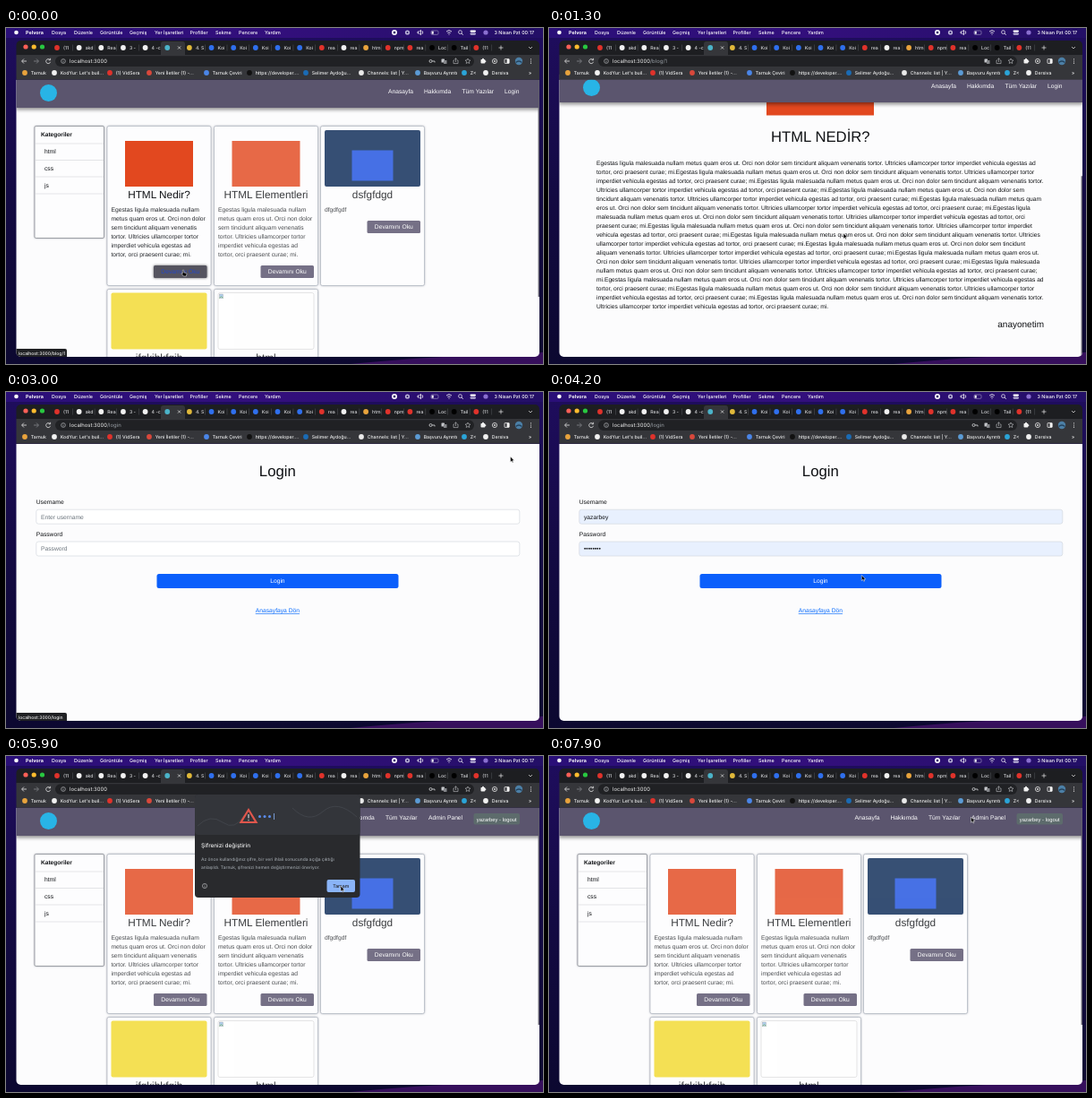
Recreate the animation shown at these times as an HTML page. Size 600 by 375 pixels, loop 8000 ms.

```html
<!DOCTYPE html>
<html lang="tr">
<head>
<meta charset="utf-8">
<style>
html, body { margin: 0; width: 100%; height: 100%; overflow: hidden; background: #120a33; }
svg { display: block; width: 600px; height: 375px; }
text { white-space: pre; text-rendering: geometricPrecision; }
.page, .page p { font-family: "Liberation Sans", Arial, sans-serif; font-size: 6.73px; }
.ui { font-family: Inter, sans-serif; font-size: 5.2px; font-weight: 500; }
.page p { margin: 0; font-size: 6.7px; line-height: 10px; color: #0f1114; text-rendering: geometricPrecision; }
.nav { filter: drop-shadow(0 2px 2px #0007); }
.frame { fill: #fdfdfe; stroke: #a4abb8; stroke-width: .6; filter: drop-shadow(0 0 1px #3a425566); }
</style>
</head>
<body>
<svg id="stage" viewBox="0 0 600 375"></svg>
<script>
const INK = '#0f1114', NAV = '#5b556e', BAR = '#35363a', ORANGE = '#e2481f';

const text = (x, y, s, attrs = '') => `<text x="${x}" y="${y}" ${attrs}>${s}</text>`;
const mid = (x, y, s, attrs = '') => text(x, y, s, 'text-anchor="middle" ' + attrs);
const rect = (x, y, w, h, fill, r = 0, attrs = '') =>
  `<rect x="${x}" y="${y}" width="${w}" height="${h}" fill="${fill}" rx="${r}" ${attrs}/>`;
const dot = (x, y, r, fill, attrs = '') => `<circle cx="${x}" cy="${y}" r="${r}" fill="${fill}" ${attrs}/>`;
const line = (d, color, w = .8) => `<path d="${d}" fill="none" stroke="${color}" stroke-width="${w}"/>`;
const group = (id, body, attrs = '') => `<g id="${id}" ${attrs}>${body}</g>`;
const size = n => `style="font-size:${n}px"`;
const backdrop = rect(11, 58, 586, 310, '#fcfcfd');

// Desktop menu bar
function menuBar() {
  const items = [[51, 'Dosya'], [76, 'Düzenle'], [105, 'Görüntüle'], [138, 'Geçmiş'], [166, 'Yer İşaretleri'],
    [205.5, 'Profiller'], [234, 'Sekme'], [260, 'Pencere'], [289, 'Yardım']];
  return `<g class="ui" fill="#fff" style="font-size:5.4px">` + dot(11.5, 5, 2.3, '#fff')
    + text(22, 7, 'Pelvora', 'font-weight="700"')
    + items.map(([x, s]) => text(x, 7, s)).join('')
    + dot(434, 5, 3, '#fff') + rect(432.8, 3.8, 2.4, 2.4, '#2a1668')
    + dot(448.5, 5, 2.6, '#b9b2d6') + dot(448.5, 5, 1, '#2a1668')
    + line('M460 4h1.5l2-1.6v5.2l-2-1.6h-1.5zM465 3.2q1.6 1.8 0 3.6', '#fff')
    + rect(475, 3, 8, 4.4, 'none', 1.2, 'stroke="#a49dc4" stroke-width=".6"') + rect(475.7, 3.7, 2, 3, '#fff')
    + line('M492 4q3-3 6 0M493.4 5.6q1.6-1.5 3.2 0', '#fff') + dot(495, 7, .6, '#fff')
    + dot(507.5, 4.6, 1.9, 'none', 'stroke="#fff" stroke-width=".7"') + line('M509 6l1.7 1.8', '#fff')
    + rect(518.5, 2.4, 6.5, 2.3, '#fff', 1.1) + rect(518.5, 5.4, 6.5, 2.3, '#b9b2d6', 1.1)
    + dot(536, 5, 2.6, '#8a6fd0')
    + text(545.5, 7, '3 Nisan Pzt 00:17') + '</g>';
}

// Browser tabs, address bar and bookmarks
function browser() {
  const white = '#f1f1f1', red = '#e0322b', blue = '#2f6fed';
  const tabs = [[red, '(11'], [white, 'akd'], [white, 'Rea'], [white, '3 -'], [white, '4 -c'], ['#4bb3c9', ''],
    ['#e0b83a', '4. S'], [blue, 'Koi'], [blue, 'Koi'], [blue, 'Koi'], [blue, 'Koi'], [blue, 'Koi'], [red, 'rea'],
    [white, 'rea'], ['#e8a33c', 'htm'], [red, 'npm'], [red, 'rea'], ['#000', 'Loc'], ['#000', 'Tail'], [red, '(11']];
  const marks = [[21, '#e8a33c', 'Tarnuk'], [54, white, "KodYur: Let's buil..."], [116, red, '(1) VidSera'],
    [160, '#d9483b', 'Yeni İletiler (1) -...'], [224, '#4a86e8', 'Tarnuk Çeviri'], [272, '#111', 'https://developer....'],
    [335, '#1a6bb5', 'Selimer Aydoğu...'], [397, '#e9e9e9', 'Channels: list | Y...'], [460, '#5b9bd5', 'Başvuru Ayrıntı'],
    [512, '#2aa4d8', 'Z&lt;'], [536, white, 'Dersiva']];
  let s = rect(11, 14, 586, 17, '#1d1e21') + rect(11, 30, 586, 27.7, BAR)
    + rect(173, 15, 27, 20, BAR, 3)
    + dot(22, 21, 2.6, '#ff5f57') + dot(31.2, 21, 2.6, '#febc2e') + dot(40.5, 21, 2.6, '#28c840');
  tabs.forEach(([color, name], i) => {
    const x = 57 + i * 24.65;
    s += dot(x, 22, 2.9, color) + text(x + 7, 24, name, 'fill="#d5d6d9"');
    if (i != 4 && i != 5) s += rect(x + 17.2, 18.5, .5, 7, '#55575c');
  });
  s += line('M192 20.4l3.2 3.2M195.2 20.4l-3.2 3.2M550.5 22h5M553 19.5v5M584 21l2 2 2-2', '#e8e8e8', .7)
    + line('M23 37h-5M20 34.5l-2.5 2.5 2.5 2.5', '#e8e8e8')
    + line('M31 37h5M34 34.5l2.5 2.5-2.5 2.5', '#85878b')
    + line('M49 35.4a2.5 2.5 0 1 0 .6 2.4M49.6 33.8v2h-2', '#e8e8e8')
    + rect(55, 31.2, 468, 11.8, '#202124', 5.9)
    + dot(64, 37, 2.4, 'none', 'stroke="#c4c6ca" stroke-width=".6"') + line('M64 36.6v1.8M64 35.4v.5', '#c4c6ca', .6)
    + `<text x="71" y="39" fill="#f1f1f1" font-weight="400" style="font-size:5.95px">localhost:3000<tspan id="path" fill="#9aa0a6"></tspan></text>`
    + group('key', dot(474.5, 37, 1.5, 'none', 'stroke="#d5d6d9" stroke-width=".8"') + line('M476 37h3v1.5', '#d5d6d9'))
    + rect(486.5, 34.5, 3.5, 4, '#c4c6ca', .5) + rect(489, 36, 3.5, 4, '#85878b', .5)
    + line('M501 36h-1v3.6h5V36h-1M502.5 38v-4M501.2 35l1.3-1.2 1.3 1.2', '#c4c6ca', .6)
    + line('M516 34l.9 1.9 2 .2-1.5 1.4.4 2-1.8-1-1.8 1 .4-2-1.5-1.4 2-.2z', '#c4c6ca', .6)
    + rect(530.5, 35, 4.8, 4.6, '#f1f1f1', .8) + dot(533, 34.8, 1, '#f1f1f1') + dot(535.4, 37.3, 1, '#f1f1f1')
    + dot(546, 37, 2.6, 'none', 'stroke="#e8e8e8" stroke-width=".8"') + dot(546, 37, .9, '#e8e8e8')
    + rect(557, 34.6, 5.2, 4.8, 'none', .5, 'stroke="#f1f1f1" stroke-width=".8"') + rect(559.6, 34.6, 2.6, 4.8, '#f1f1f1')
    + dot(573, 37, 4.2, '#4c7fa6') + line('M569.6 38.5q3.4-3 6.8 0', '#22415c', 1.6)
    + [34.8, 37, 39.2].map(y => dot(586.5, y, .6, '#e8e8e8')).join('');
  for (const [x, color, name] of marks)
    s += dot(x, 50, 2.9, color) + text(x + 6.7, 51.9, name, 'fill="#eceded"');
  s += text(584, 52, '»', 'fill="#eceded"');
  return `<g class="ui">${s}</g>`;
}

function navBar(id, links, y, extra = '') {
  return group(id, rect(11, 57.7, 586, 31.3, NAV, 0, 'class="nav"') + dot(47.5, 72.5, 9.5, '#28b4e6')
    + links.map(([x, s]) => text(x, y, s, 'fill="#fff"')).join('') + extra);
}
const guestLinks = [[427, 'Anasayfa'], [467, 'Hakkımda'], [509.5, 'Tüm Yazılar'], [557, 'Login']];
const userLinks = [[341.5, 'Anasayfa'], [381.5, 'Hakkımda'], [424, 'Tüm Yazılar'], [472, 'Admin Panel']];

const SENTENCE = 'Egestas ligula malesuada nullam metus quam eros ut. Orci non dolor sem tincidunt aliquam venenatis '
  + 'tortor. Ultricies ullamcorper tortor imperdiet vehicula egestas ad tortor, orci praesent curae; mi.';
const EXCERPT = ['Egestas ligula malesuada nullam', 'metus quam eros ut. Orci non dolor', 'sem tincidunt aliquam venenatis',
  'tortor. Ultricies ullamcorper tortor', 'imperdiet vehicula egestas ad', 'tortor, orci praesent curae; mi.'];

// Cards are drawn at the origin of their own corner
const htmlMark = rect(20, 16.5, 76, 51, ORANGE);
const cssPic = rect(4.5, 4.5, 107, 63, '#0b2a56', 2) + rect(35, 27, 46, 34, '#1f52e0');
const jsPic = rect(4.5, 4, 107, 63, '#f2d92f', 2);
const noPic = rect(4.5, 4, 107, 63, '#fff', 2, 'stroke="#ccc" stroke-width=".6"')
  + rect(6, 5.5, 4, 4.6, '#9fc3ea', 0, 'stroke="#888" stroke-width=".4"') + line('M6 10l2-2 2 2', '#5aa54a');
const cards = [
  [113, 109.5, htmlMark, 'HTML Nedir?', EXCERPT, 155.5],
  [232.5, 109.5, htmlMark, 'HTML Elementleri', EXCERPT, 155.5],
  [351.5, 109.5, cssPic, 'dsfgfdgd', ['dfgdfgdf'], 105.5],
  [113, 291.5, jsPic, 'jfgkjhkfgjh', [], 155.5],
  [232.5, 291.5, noPic, 'html', [], 155.5]];

function card([x, y, pic, title, lines, by], i) {
  return `<g transform="translate(${x} ${y})">` + rect(0, 0, 116, 178, '#fff', 2, 'class="frame"')
    + group('card' + i, pic + mid(58, 80, title, `fill="${INK}" ${size(11.8)}`)
      + lines.map((s, n) => text(4.5, 95.9 + n * 10, s, 'fill="#24272b"')).join('')
      + rect(52, by, 59.5, 14, '#58526c', 1.5, `id="btn${i}"`)
      + mid(81.8, by + 9.3, 'Devamını Oku', `fill="#fff" id="label${i}"`)) + '</g>';
}

function home() {
  const rows = [[140.3, 'html'], [159.2, 'css'], [177.8, 'js']];
  return backdrop + rect(32, 109.5, 77.5, 125, '#fff', 1.5, 'class="frame" style="stroke:#6b6e76"')
    + text(39, 121.3, 'Kategoriler', `fill="${INK}" font-weight="700" ${size(6.6)}`)
    + rows.map(([y, s]) => text(43, y, s, `fill="${INK}"`)).join('')
    + [129, 147.5, 166, 185].map(y => rect(32.4, y - .3, 76.7, .6, '#d3d4d8')).join('')
    + cards.map(card).join('')
    + navBar('guestNav', guestLinks, 72.6)
    + navBar('userNav', userLinks, 71.3, rect(522.5, 64, 51.5, 12.5, '#5d6b6c', 2)
      + mid(548.2, 72.6, 'yazarbey - logout', `fill="#fff" ${size(5.85)}`));
}

function article() {
  return backdrop
    + group('scroll', rect(243, 133.5, 120, 135, ORANGE)
      + mid(303.3, 297.5, 'HTML NEDİR?', `fill="${INK}" ${size(16.7)}`)
      + `<foreignObject x="53" y="317.9" width="500" height="180"><p>${SENTENCE.repeat(14)}</p></foreignObject>`
      + text(553, 505.3, 'anayonetim', `fill="${INK}" text-anchor="end" ${size(10)}`))
    + navBar('articleNav', guestLinks, 72.6);
}

function login() {
  const field = (y, id, hint) => rect(33.8, y, 540, 16, '#fff', 2.5, `id="${id}Box" stroke="#ced4da" stroke-width=".6"`)
    + text(39, y + 10.4, hint, `id="${id}" fill="#6c757d"`);
  return backdrop + mid(303.4, 94, 'Login', `fill="${INK}" ${size(16.8)}`)
    + text(33.7, 125.4, 'Username', `fill="${INK}"`) + field(131.2, 'user', 'Enter username')
    + text(33.7, 161.1, 'Password', `fill="${INK}"`) + field(167, 'pass', 'Password')
    + rect(168.5, 203, 270, 16, '#0b5ffb', 2.5) + mid(303.4, 213.3, 'Login', 'fill="#fff"')
    + mid(303.4, 246, 'Anasayfaya Dön', 'fill="#0d6efd" text-decoration="underline"');
}

function dialog() {
  return rect(211, 43, 184.5, 115, '#292a2d', 4) + rect(211, 43, 184.5, 45, '#33353a', 4)
    + line('M214 78q14-14 28-4t24-8M320 58q18 18 34 4t38 6', '#45484e')
    + line('M271 60l8.5 14h-17z', '#e0564c', 2.2) + line('M271 65v4.5M271 71v1.2', '#f2f2f2', 1)
    + [283.5, 289, 294.5].map(x => dot(x, 67.5, 1.5, '#5b8def')).join('') + rect(299, 64, .8, 7, '#8ab4f8')
    + text(218, 102, 'Şifrenizi değiştirin', `fill="#f1f1f1" ${size(6.4)}`)
    + text(218, 117, 'Az önce kullandığınız şifre, bir veri ihlali sonucunda açığa çıktığı', `fill="#9aa0a6" ${size(4.9)}`)
    + text(218, 125.5, 'anlaşıldı. Tarnuk, şifrenizi hemen değiştirmenizi öneriyor.', `fill="#9aa0a6" ${size(4.9)}`)
    + dot(222, 145, 2.6, 'none', 'stroke="#c4c6ca" stroke-width=".6"') + line('M222 144.6v2M222 143.2v.6', '#c4c6ca', .6)
    + rect(358.5, 138, 31.5, 14, '#8ab4f8', 2) + mid(374.2, 147, 'Tamam', 'fill="#202124"');
}

const $ = id => document.getElementById(id);
$('stage').innerHTML = `<defs>
  <linearGradient id="desk" x2="0" y2="1"><stop stop-color="#1f0d5e"/><stop offset=".5" stop-color="#130a42"/>
    <stop offset="1" stop-color="#0c0830"/></linearGradient>
  <linearGradient id="menu"><stop stop-color="#2a0f78"/><stop offset=".5" stop-color="#330f7c"/><stop offset="1" stop-color="#230f66"/></linearGradient>
  <clipPath id="window"><rect x="11.5" y="14" width="584.5" height="353" rx="5"/></clipPath></defs>`
  + rect(0, 0, 600, 375, 'url(#desk)') + '<path d="M385 375Q470 366 600 362V375Z" fill="#360f5c"/>'
  + rect(0, 0, 600, 11, 'url(#menu)') + menuBar()
  + `<g clip-path="url(#window)"><g class="page">${group('home', home())}${group('article', article())}${group('login', login())}</g>`
  + rect(594.6, 58, 2, 201, '#5f5c6c', 0, 'id="thumb"')
  + browser() + group('status', rect(8, 358, 60, 12, '#202124', 2)
    + text(14, 364.6, '', `id="statusText" fill="#f1f1f1" ${size(5)}`), 'class="ui"') + '</g>'
  + group('dialog', dialog(), 'class="ui"')
  + group('cursor', '<path id="arrow" d="M0 0V6.2L1.5 4.9 2.5 7 3.4 6.6 2.5 4.6H4.4Z"/>'
    + '<path id="hand" d="M1 0q.8 0 .8.8V3l2.6.6q.6.2.5 1L4.4 7H1.4L-.9 4.3q0-.8.8-.5l.4.4V.8Q.3 0 1 0Z"/>',
    'fill="#000" stroke="#fff" stroke-width=".5"');

// Keyframes [time, ...values], eased between neighbours
function tween(keys, t) {
  const i = keys.findIndex(k => k[0] > t);
  if (i < 0) return keys.at(-1).slice(1);
  if (i == 0) return keys[0].slice(1);
  const [a, b] = [keys[i - 1], keys[i]];
  const u = (t - a[0]) / (b[0] - a[0]), e = u * u * (3 - 2 * u);
  return a.slice(1).map((v, n) => v + (b[n + 1] - v) * e);
}
const pointer = [[0, 197, 270], [400, 197, 270], [1000, 329, 229], [1400, 329, 229], [1900, 333.5, 209], [2050, 334, 208],
  [2600, 563.5, 72], [3100, 563.5, 72], [3500, 300, 139], [3800, 300, 139], [4300, 355, 212], [5100, 355, 212],
  [5700, 374, 145], [6000, 374, 145], [6700, 485.5, 81], [7100, 485.5, 81], [7600, 471.5, 68], [8000, 471.5, 68]];
const scrolling = [[500, 0], [1200, 171], [1350, 171], [1500, 165], [1850, -6.3], [1950, -6.3], [2200, 0]];
const fade = [[4800, 0], [4900, .25], [5000, .66], [5200, 1], [5900, 1], [6100, 0]];

const show = (id, on) => $(id).style.display = on ? '' : 'none';
const move = (id, x, y) => $(id).setAttribute('transform', `translate(${x} ${y})`);

function fill(id, on, value, hint) {
  $(id).textContent = on ? value : hint;
  $(id).setAttribute('fill', on ? INK : '#6c757d');
  $(id + 'Box').setAttribute('fill', on ? '#e8f0fe' : '#fff');
}

function draw(t) {
  const page = t < 400 ? 'home' : t < 2800 ? 'article' : t < 4700 ? 'login' : 'home';
  const path = { home: '', article: '/blog/1', login: '/login' }[page];
  for (const id of ['home', 'article', 'login']) show(id, id == page);
  $('path').textContent = path;
  show('key', page != 'article');
  show('guestNav', t < 400);
  show('userNav', t >= 400);

  const [x, y] = tween(pointer, t);
  move('cursor', x, y);
  show('hand', t < 400);
  show('arrow', t >= 400);

  cards.forEach(([cx, cy], i) => {
    const over = x > cx && x < cx + 116 && y > cy && y < cy + 178 && !(t > 5300 && t < 6100);
    $('card' + i).setAttribute('opacity', over ? 1 : .82);
  });
  $('btn0').setAttribute('fill', t < 400 ? '#55545f' : '#58526c');
  $('btn0').style.filter = t < 400 ? 'drop-shadow(0 0 1.5px #0009)' : '';
  $('label0').setAttribute('fill', t < 400 ? '#2547c4' : '#fff');

  const [s] = tween(scrolling, t);
  move('scroll', 0, -s);
  move('articleNav', 0, s > 165 ? 165 - s : Math.max(0, -s));

  // The scroll thumb spans the visible share of the page
  show('thumb', page != 'login');
  $('thumb').setAttribute('height', page == 'home' ? 242 : 201);
  move('thumb', 0, page == 'article' ? Math.min(165, Math.max(0, s)) * .65 : 0);

  fill('user', t >= 3800, 'yazarbey', 'Enter username');
  fill('pass', t >= 3800, '•'.repeat(8), 'Password');

  const link = t < 400 ? '/blog/1' : t >= 2600 && t < 3200 ? '/login' : '';
  show('status', link);
  $('statusText').textContent = 'localhost:3000' + link;
  $('dialog').setAttribute('opacity', tween(fade, t)[0]);
}

const start = performance.now();
function loop() {
  draw(Math.floor((performance.now() - start) % 8000 / 100) * 100);
  requestAnimationFrame(loop);
}
loop();
</script>
</body>
</html>
```
